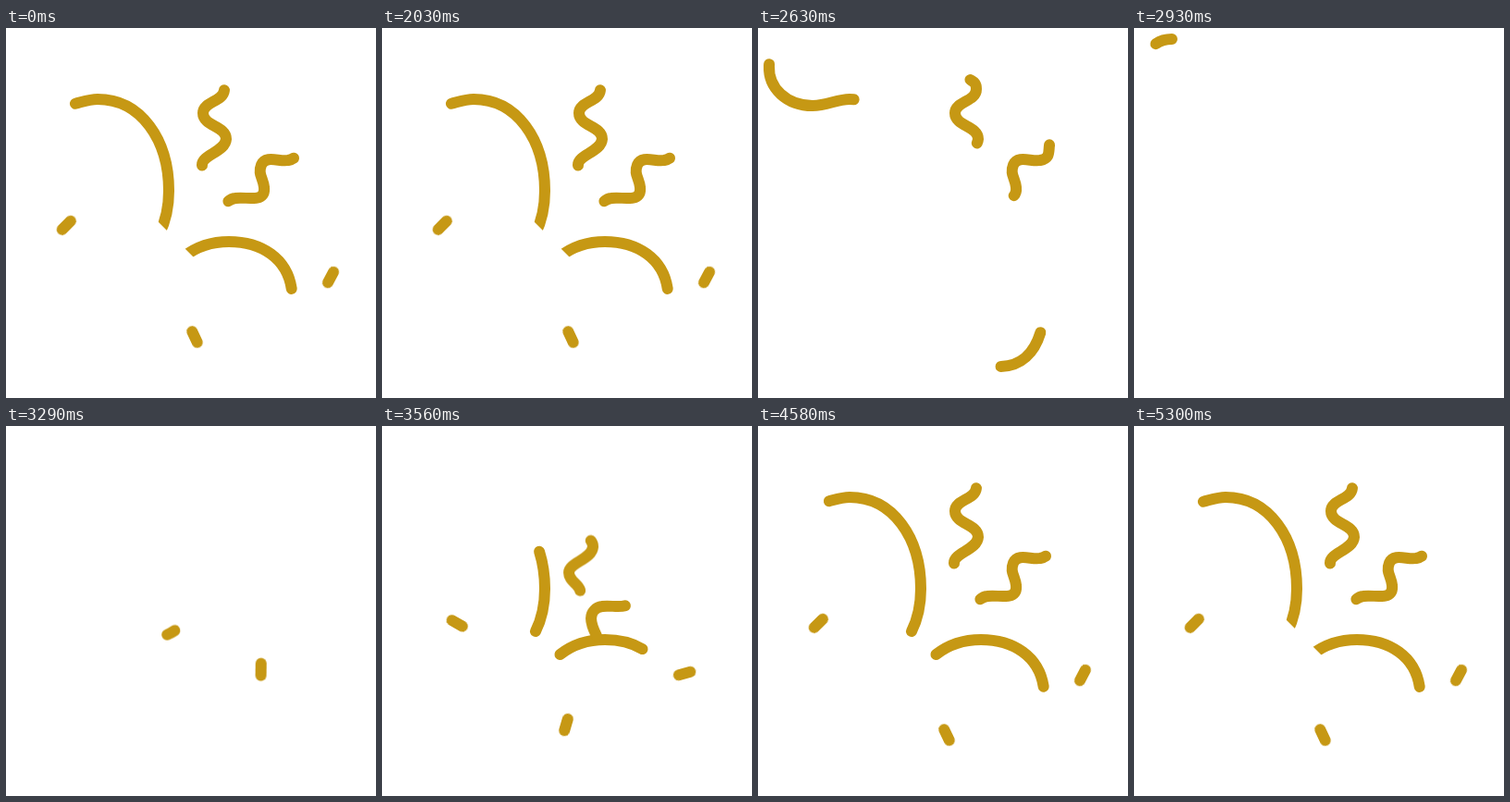
An HTML page without scripts that plays this animation: 400 px wide and 400 px high, repeating every 5330 ms.

```html
<!DOCTYPE html>
<html lang="en">
<head>
<meta charset="utf-8">
<title>Confetti popper</title>
<style>
  html, body { margin: 0; width: 100%; height: 100%; overflow: hidden; background: #fff; }
  svg { display: block; width: 100vw; height: 100vh; }
  .confetti { fill: none; stroke: #c69814; stroke-width: 12; stroke-linecap: round; }
  .confetti *, .cone { animation: 5330ms linear infinite; }

  /* Streamers: the dash is the visible piece, the offset is its tail. */
  .arc-left { animation-name: arc-left; }
  .arc-right { animation-name: arc-right; }
  .wave-up { animation-name: wave-up, drift; --x: -10px; --y: 10.5px; }
  .wave-side { animation-name: wave-side, drift; --x: -10px; --y: 11px; }

  @keyframes arc-left {
    0%, 38.09% { stroke-dasharray: 212 999; stroke-dashoffset: 0; animation-timing-function: cubic-bezier(.4, 0, .8, .7); }
    49.34% { stroke-dasharray: 119 999; stroke-dashoffset: -182; animation-timing-function: cubic-bezier(.3, .5, .6, 1); }
    59% { stroke-dasharray: 0 999; stroke-dashoffset: -360; }
    59.01%, 61.7% { stroke-dasharray: 0 999; stroke-dashoffset: 10; }
    61.73% { stroke-dasharray: 0 999; stroke-dashoffset: 1; animation-timing-function: cubic-bezier(.23, .55, .4, .98); }
    89.1%, 100% { stroke-dasharray: 212 999; stroke-dashoffset: 0; }
  }
  @keyframes arc-right {
    0%, 38.09% { stroke-dasharray: 145 999; stroke-dashoffset: 0; animation-timing-function: cubic-bezier(.4, 0, .8, .7); }
    49.34% { stroke-dasharray: 61 999; stroke-dashoffset: -192; animation-timing-function: cubic-bezier(.3, .5, .6, 1); }
    57% { stroke-dasharray: 0 999; stroke-dashoffset: -300; }
    57.01%, 61.7% { stroke-dasharray: 0 999; stroke-dashoffset: 10; }
    61.73% { stroke-dasharray: 0 999; stroke-dashoffset: 1; animation-timing-function: cubic-bezier(.3, .5, .7, .85); }
    66.79% { stroke-dasharray: 94 999; stroke-dashoffset: 0; animation-timing-function: cubic-bezier(.3, .5, .7, .85); }
    75.8% { stroke-dasharray: 135 999; animation-timing-function: ease-out; }
    87%, 100% { stroke-dasharray: 145 999; stroke-dashoffset: 0; }
  }
  @keyframes wave-up {
    0%, 38.09% { stroke-dasharray: 115 999; stroke-dashoffset: -55; animation-timing-function: cubic-bezier(.4, 0, .8, .7); }
    49.34% { stroke-dasharray: 94 999; stroke-dashoffset: -90; animation-timing-function: cubic-bezier(.3, .5, .6, 1); }
    58% { stroke-dasharray: 0 999; stroke-dashoffset: -215; }
    58.01%, 61.2% { stroke-dasharray: 0 999; stroke-dashoffset: 10; }
    61.73% { stroke-dasharray: 9 999; stroke-dashoffset: 0; animation-timing-function: cubic-bezier(.3, .5, .7, .85); }
    66.79% { stroke-dasharray: 70 999; stroke-dashoffset: -32; animation-timing-function: cubic-bezier(.3, .5, .7, .95); }
    75.8% { stroke-dasharray: 113 999; stroke-dashoffset: -54; animation-timing-function: ease-out; }
    86%, 100% { stroke-dasharray: 115 999; stroke-dashoffset: -55; }
  }
  @keyframes wave-side {
    0%, 38.09% { stroke-dasharray: 110 999; stroke-dashoffset: -31; animation-timing-function: cubic-bezier(.4, 0, .8, .7); }
    49.34% { stroke-dasharray: 88 999; stroke-dashoffset: -68; animation-timing-function: cubic-bezier(.3, .5, .6, 1); }
    58% { stroke-dasharray: 0 999; stroke-dashoffset: -205; }
    58.01%, 61.73% { stroke-dasharray: 0 999; stroke-dashoffset: 10; animation-timing-function: cubic-bezier(.3, .5, .7, .85); }
    66.79% { stroke-dasharray: 64 999; stroke-dashoffset: 0; animation-timing-function: cubic-bezier(.3, .5, .7, .95); }
    75.8% { stroke-dasharray: 106 999; stroke-dashoffset: -26; animation-timing-function: ease-out; }
    86%, 100% { stroke-dasharray: 110 999; stroke-dashoffset: -31; }
  }
  @keyframes drift {
    0%, 58% { transform: none; }
    58.01%, 61.73% { transform: translate(calc(var(--x) * 3), calc(var(--y) * 3.4)); animation-timing-function: cubic-bezier(.3, .5, .7, .85); }
    66.79% { transform: translate(var(--x), var(--y)); animation-timing-function: ease-out; }
    75%, 100% { transform: none; }
  }

  /* Chips: fly off, then spin out from behind the cone. */
  .confetti .chip { animation-name: chip; }
  .chip.left { --a: -45deg; --x: 16px; --y: 0px; --spin: 75deg; --ox: -82px; --oy: 2px; }
  .chip.bottom { --a: 65deg; --x: -5px; --y: -11px; --spin: -139deg; --ox: 15px; --oy: 85px; }
  .chip.right { --a: 118deg; --x: -24px; --y: -2px; --spin: -134deg; --ox: 68px; --oy: 4px; }

  @keyframes chip {
    0%, 38.09% { transform: rotate(var(--a)); opacity: 1; animation-timing-function: cubic-bezier(.4, .1, .8, .6); }
    48.2% { transform: translate(var(--ox), var(--oy)) rotate(calc(var(--a) - var(--spin))); opacity: 1; }
    48.21%, 59.6% { transform: translate(calc(var(--x) * 5.5), calc(var(--y) * 5.5)) rotate(calc(var(--a) + var(--spin) * 2)); opacity: 0; }
    59.61% { transform: translate(calc(var(--x) * 5.5), calc(var(--y) * 5.5)) rotate(calc(var(--a) + var(--spin) * 2)); opacity: 1; }
    61.73% { transform: translate(calc(var(--x) * 3.15), calc(var(--y) * 3.15)) rotate(calc(var(--a) + var(--spin) * 1.55)); animation-timing-function: cubic-bezier(.3, .5, .7, .85); }
    66.79% { transform: translate(var(--x), var(--y)) rotate(calc(var(--a) + var(--spin))); animation-timing-function: cubic-bezier(.3, .5, .7, .9); }
    75.8% { transform: translate(calc(var(--x) * .12), calc(var(--y) * .12)) rotate(calc(var(--a) + var(--spin) * .26)); animation-timing-function: ease-out; }
    87%, 100% { transform: rotate(var(--a)); opacity: 1; }
  }

  /* White cone, only seen where it covers the confetti. */
  .cone { fill: #fff; transform-origin: 65px 348px; animation-name: recoil; }
  @keyframes recoil {
    0%, 38.09% { transform: none; animation-timing-function: ease-in; }
    48%, 88.5% { transform: scale(.88); animation-timing-function: ease-in-out; }
    99.4%, 100% { transform: none; }
  }
</style>
</head>
<body>
<svg viewBox="0 0 400 400">
  <g class="confetti">
    <path class="arc-left" d="M166 222C173 208 176 192 176 176C176 121 146 77 99 77C85 77 75 84 59 84C31 84 11 65 12 41C13 22 25 12 41 12"/>
    <path class="arc-right" d="M192.500 247C206.500 236 222.500 231 241 231C277 231 305 250 309 284C313 330 297 366 261 366C250 366 240 362 232 356"/>
    <path class="wave-up" d="M204 190C214 186 226 176 224 167C222 160 212 157 212 148C212 137 237 134 238 120C238 106 213 106 213 92C213 79 236 80 236 66C236 58 232 58 228 55L217 49"/>
    <path class="wave-side" d="M242 216C238 208 236 202 236 197C236 190 241 185 248 184C260 182 281 190 279 172C278 162 272 158 276 148C281 137 296 145 305 143C316 141 314 134 315 127C315 118 321 114 328 113"/>
    <g transform="translate(65.3 213.3)"><path class="chip left" d="M-6.5 0H6.5"/></g>
    <g transform="translate(204 334)"><path class="chip bottom" d="M-6.5 0H6.5"/></g>
    <g transform="translate(351 269.5)"><path class="chip right" d="M-6.5 0H6.5"/></g>
  </g>
  <path class="cone" d="M116 161L250 295L65 348Z"/>
</svg>
</body>
</html>
```
